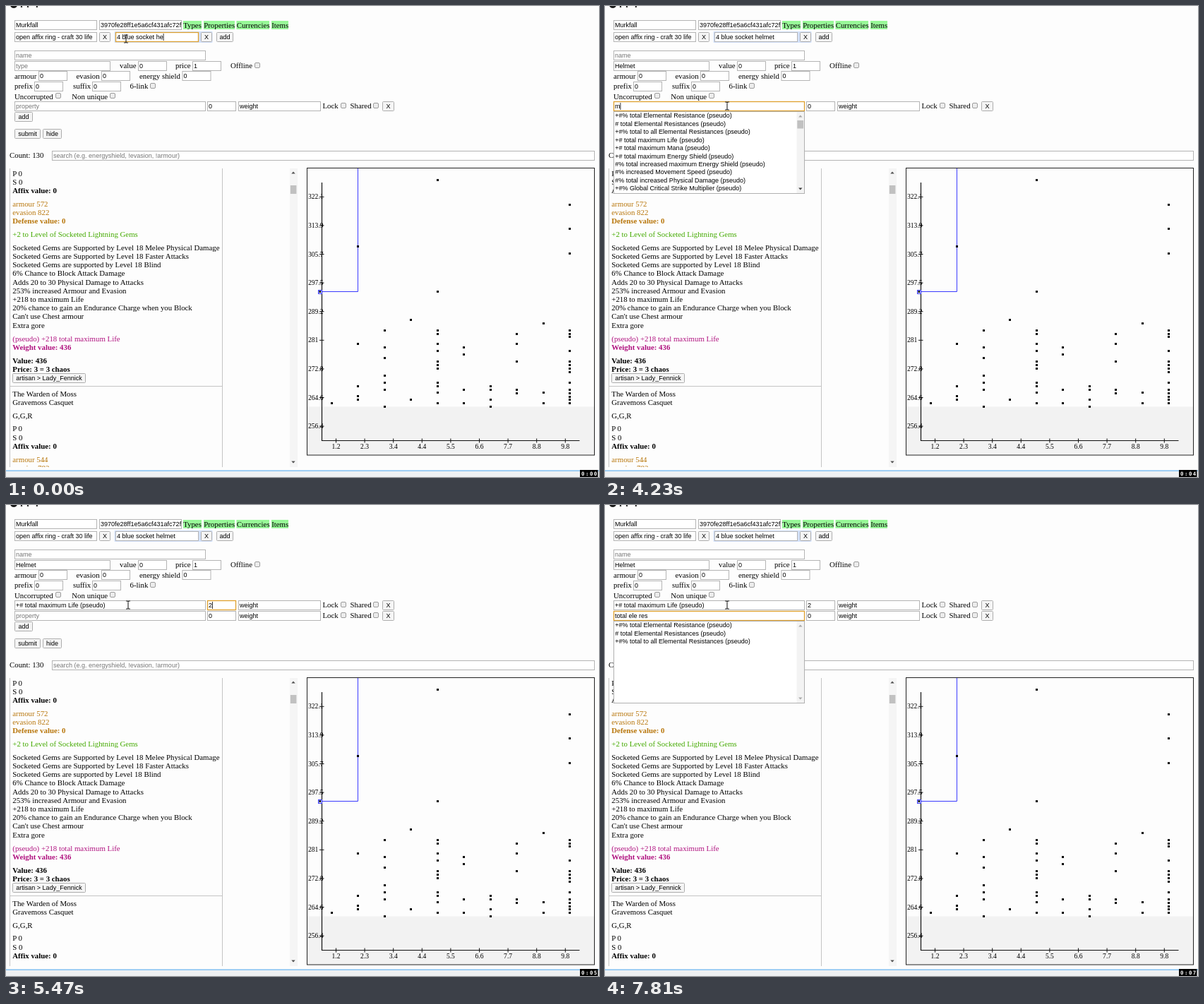
These frames come from a looping animation (840 px wide and 667 px high, 8 s). An HTML page:

```html
<!DOCTYPE html>
<html lang="en">
<head>
<meta charset="utf-8">
<title>Price search</title>
<style>
html, body { margin: 0; width: 100%; height: 100%; overflow: hidden; background: #fdfdfd; }
svg { display: block; }
text { white-space: pre; fill: #000; }
.serif { font: 10.83px "Liberation Serif", serif; }
.tick { font: 9.6px "Liberation Serif", serif; }
.bold { font-weight: bold; }
.sans { font: 9.03px "Liberation Sans", sans-serif; }
.mid { text-anchor: middle; }
.hint { fill: #757575; }
.clock { font: bold 7.4px "DejaVu Sans Mono", monospace; letter-spacing: 1.5px; fill: #fff; }
.orange { fill: #b8760b; }
.green { fill: #4a0; }
.purple { fill: #b0117f; }
</style>
</head>
<body>
<svg id="stage" width="840" height="667" viewBox="0 0 840 667"></svg>
<script>
const NS = 'http://www.w3.org/2000/svg';
const LOOP = 8000;
const stage = document.getElementById('stage');
let layer = stage;

function add(tag, attrs, parent = layer) {
  const node = document.createElementNS(NS, tag);
  for (const key in attrs) node.setAttribute(key, attrs[key]);
  return parent.appendChild(node);
}
function group(attrs, draw, parent = stage) {
  const before = layer, node = add('g', attrs, parent);
  layer = node;
  draw();
  layer = before;
  return node;
}
const box = (x, y, w, h, fill, stroke = 'none', rx = 0) =>
  add('rect', { x, y, width: w, height: h, fill, stroke, rx });
const line = (d, stroke, w = 1) => add('path', { d, stroke, fill: 'none', 'stroke-width': w });
const show = (node, on) => node.style.display = on ? '' : 'none';

function label(x, y, str, cls = 'serif') {
  const node = add('text', { x, y, class: cls });
  node.textContent = str;
  return node;
}
function button(x, y, w, str) {
  box(x + .5, y + .5, w - 1, 13, '#f5f5f5', '#adadad', 1);
  label(x + w / 2, y + 10.1, str, 'sans mid');
}
const check = (x, y) => box(x + .5, y + .5, 7, 7, '#ececec', '#9c9c9c', 1.5);
const arrow = (x, y, dir) =>
  add('path', { d: `M${x - 2.7} ${y + 1.4 * dir}h5.4l-2.7 ${-3 * dir}z`, fill: '#505050' });

function field(x, y, w, value, hint = '') {
  const frame = box(x + .5, y + .5, w - 1, 13, '#fff', '#b4b4b4');
  const mark = box(x + 1.7, y + 2, 5.2, 10, '#3297fd');
  const text = label(x + 2, y + 10.1, '', 'sans');
  const caret = box(0, y + 2, .8, 10, '#000');
  return {
    set(value, focus = false, blink = false, marked = false) {
      const empty = value === '';
      text.textContent = empty ? hint : value;
      text.setAttribute('class', empty ? 'sans hint' : 'sans');
      text.style.fill = marked ? '#fff' : '';
      frame.setAttribute('stroke', focus ? '#dfa12e' : '#b4b4b4');
      frame.setAttribute('stroke-width', focus ? 1.3 : 1);
      show(mark, marked);
      show(caret, focus && blink);
      if (focus && blink)
        caret.setAttribute('x', x + 2 + (empty ? 0 : text.getComputedTextLength()));
    },
    init() { this.set(value); return this; }
  }.init();
}
function propertyRow(y) {
  const prop = field(12, y, 271, '', 'property');
  const amount = field(285, y, 41, '0', 'weight');
  field(329, y, 117, 'weight');
  label(448.5, y + 10.4, 'Lock');
  check(474, y + 2);
  label(487.5, y + 10.4, 'Shared');
  check(520, y + 2);
  button(533, y, 17, 'X');
  return { prop, amount };
}

// Result list: [y, text, style]
const RESULTS = [
  [237, 'P 0'], [249, 'S 0'], [261.3, 'Affix value: 0', 'bold'],
  [280.2, 'armour 572', 'orange'], [292.4, 'evasion 822', 'orange'],
  [304.6, 'Defense value: 0', 'orange bold'],
  [323.5, '+2 to Level of Socketed Lightning Gems', 'green'],
  ...['Socketed Gems are Supported by Level 18 Melee Physical Damage',
    'Socketed Gems are Supported by Level 18 Faster Attacks',
    'Socketed Gems are supported by Level 18 Blind',
    '6% Chance to Block Attack Damage',
    'Adds 20 to 30 Physical Damage to Attacks',
    '253% increased Armour and Evasion',
    '+218 to maximum Life',
    '20% chance to gain an Endurance Charge when you Block',
    "Can't use Chest armour",
    'Extra gore'].map((str, i) => [342.4 + 12.18 * i, str]),
  [471, '(pseudo) +218 total maximum Life', 'purple'],
  [483.2, 'Weight value: 436', 'purple bold'],
  [502, 'Value: 436', 'bold'], [514.2, 'Price: 3 = 3 chaos', 'bold'],
  [549, 'The Warden of Moss'], [561.2, 'Gravemoss Casquet'],
  [580, 'G,G,R'], [598.8, 'P 0'], [611, 'S 0'], [623.2, 'Affix value: 0', 'bold'],
  [642, 'armour 544', 'orange'], [654.2, 'evasion 782', 'orange']
];

// Chart dots: one list of heights per price 1..10
const DOTS = [
  [562],
  [340, 478, 538, 552, 557],
  [459, 483, 498, 523, 533, 543, 567],
  [444, 557],
  [246, 404, 459, 464, 478, 488, 503, 508, 513, 533, 538, 547, 562],
  [483, 493, 543, 562],
  [538, 543, 557, 567],
  [464, 478, 503, 543, 548],
  [449, 547, 562],
  [281, 315, 350, 459, 464, 468, 488, 503, 508, 513, 518, 533, 543, 548, 553, 557, 562]
];

function drawChart() {
  box(427, 230, 407, 406, '#fdfdfd');
  box(427, 567.5, 407, 68.5, '#f2f2f2');
  box(426.5, 229.5, 407, 406.5, 'none', '#222');
  line('M447.5 250V616M447 615.5H812.5', '#111', 1.2);
  for (let i = 0; i < 9; i++) {
    const y = 270.3 + 40.6 * i, x = 467.5 + 40.6 * i;
    line(`M444 ${y}h6.5M${x} 612.5v6`, '#111');
    label(428, y + 3.1, +(322.1 - 8.215 * i).toFixed(1), 'tick');
    label(x, 627.1, (1.2 + 1.08 * i).toFixed(1), 'tick mid');
  }
  line('M498.5 230V404.5H445', '#3a3aff');
  box(442.5, 402.5, 5, 5, '#dfe3ff', '#3a3aff');
  box(443.5, 403.3, 2.6, 2.6, '#000');
  DOTS.forEach((ys, i) => ys.forEach(y => box(Math.round(459.5 + 37.55 * i), y - 1, 3, 3, '#000')));
}

// Page below the property rows
add('rect', { x: 0, y: 0, width: 840, height: 653 }, add('clipPath', { id: 'view' }));
const clipped = add('g', { 'clip-path': 'url(#view)' });
const track = box(402, 230, 11, 423, '#f5f5f5');
const lower = group({}, () => {
  button(12, 150, 26, 'add');
  button(12, 174, 37, 'submit');
  button(52, 174, 27, 'hide');
  label(5, 215, 'Count: 130');
  field(65, 205, 769, '', 'search (e.g. energyshield, !evasion, !armour)');
  drawChart();
  box(402.8, 254, 8.6, 12, '#c1c1c1');
  arrow(407, 236, 1);
});
arrow(407, 646, -1);
const list = group({}, () => {
  line('M5.5 230V660M306.5 230V660M5 538.5H306', '#c4c4c4');
  for (const [y, str, cls = ''] of RESULTS) label(9.3, y + 3.5, str, 'serif ' + cls);
  button(9, 520, 104, 'artisan > Lady_Fennick');
}, clipped);

// Header and form
add('circle', { cx: 11, cy: -2.2, r: 5.2, fill: '#1b1b1b' });
label(20.5, .2, 'pip-quote', 'serif bold');
field(12, 20, 117, 'Murkfall');
field(132, 20, 117, '3970fe28ff1e5a6cf431afc72f');
[['Types', 251, 26], ['Properties', 280, 44], ['Currencies', 326.5, 46.5], ['Items', 376, 24]]
  .forEach(([str, x, w]) => {
    box(x, 21, w, 12, '#98f898');
    label(x + .2, 30.6, str);
  });
field(12, 37, 117, 'open affix ring - craft 30 life');
button(132, 37, 16, 'X');
box(153.5, 36, 139, 16, '#d3e1fb', 'none', 1);
const tab = field(155, 37, 118, '');
button(276, 37, 16, 'X');
button(298, 37, 24, 'add');
field(12, 63, 271, '', 'name');
const type = field(12, 78, 136, '', 'type');
[[161, 88, 'value', 187, '0'], [240, 88, 'price', 264, '1'],
 [12, 102.6, 'armour', 46, '0'], [99.5, 102.6, 'evasion', 135, '0'],
 [189, 102.6, 'energy shield', 249.5, '0'],
 [12, 117.2, 'prefix', 40, '0'], [95, 117.2, 'suffix', 122, '0']
].forEach(([x, y, str, fx, value]) => {
  label(x, y, str);
  field(fx, Math.round(y - 10.3), 41, value);
});
[[318, 88, 'Offline', 352], [175.5, 117.2, '6-link', 204],
 [12, 131.8, 'Uncorrupted', 70], [93.3, 131.8, 'Non unique', 147]
].forEach(([x, y, str, cx]) => {
  label(x, y, str);
  check(cx, Math.round(y - 8.4));
});
const row1 = propertyRow(135);
let row2;
const second = group({}, () => { row2 = propertyRow(150); });

// Suggestion menu
const menu = add('svg', { height: 117 });
layer = menu;
const menuBack = box(.5, .5, 0, 116, '#fff', '#b0b0b0');
const items = Array.from({ length: 10 }, (_, i) => label(2.2, 9.2 + 11.47 * i, '', 'sans'));
const bar = group({}, () => {
  box(0, 1, 10.5, 115, '#f3f3f3');
  box(.8, 13, 8.8, 11.5, '#c1c1c1');
  arrow(5.3, 7, 1);
  arrow(5.3, 110, -1);
}, menu);
layer = stage;
const [, thumb, upArrow, downArrow] = bar.children;
upArrow.setAttribute('fill', '#a8a8a8');

function setMenu(where, lines) {
  show(menu, where);
  if (!where) return;
  const [x, y, w] = where;
  menu.setAttribute('x', x);
  menu.setAttribute('y', y);
  menu.setAttribute('width', w);
  menuBack.setAttribute('width', w - 1);
  bar.setAttribute('transform', `translate(${w - 11.5} 0)`);
  items.forEach((node, i) => node.textContent = lines[i] || '');
  const long = lines.length > 9;
  show(thumb, long);
  downArrow.setAttribute('fill', long ? '#404040' : '#a8a8a8');
}

// Window edge, clock, pointer
box(0, 657.3, 840, 1.7, '#8fc6f3');
box(0, 659, 840, 8, '#eff1f3');
box(813, 657, 25.5, 10, '#000');
const clock = label(815, 664.6, '', 'clock');
const pointer = line('M-3-5.5h2.2l.8.8.8-.8h2.2M0-4.7v9.4M-3 5.5h2.2l.8-.8.8.8h2.2', '#222', 1.1);

// Suggestions
const pseudo = strs => strs.map(str => str + ' (pseudo)');
const ELEMENTAL = pseudo(['+#% total Elemental Resistance', '# total Elemental Resistances',
  '+#% total to all Elemental Resistances']);
const MAXIMUM = pseudo(['+# total maximum Life', '+# total maximum Mana',
  '+# total maximum Energy Shield', '#% total increased maximum Energy Shield']);
const DAMAGE = pseudo(['#% total increased Physical Damage']);
const ALL = [
  ...pseudo(['+#% total to Cold Resistance', '+#% total to Fire Resistance',
    '+#% total to Lightning Resistance']),
  ELEMENTAL[0],
  ...pseudo(['+#% total to Chaos Resistance', '+#% total Resistance', '# total Resistances']),
  ELEMENTAL[1], ELEMENTAL[2], '+# total to Strength (pseudo)'
];
const WITH_M = [...ELEMENTAL, ...MAXIMUM, '#% increased Movement Speed (pseudo)', ...DAMAGE,
  '+#% Global Critical Strike Multiplier (pseudo)'];
const LIFE = [MAXIMUM[0],
  ...['# to maximum Life', '#% increased maximum Life', 'Minions have #% increased maximum Life',
    'Enemies you Kill have a #% chance to Explode, dealing a quarter of their maximum Life',
    'You take #% of your maximum Life as Chaos Damage on use',
    '#% of Maximum Life taken as Chaos Damage per second',
    '#% increased maximum Life, Mana and Global Energy Shield',
    'Raised Zombies have # to maximum Life', '# to Spectre maximum Life'
  ].map(str => str + ' (explicit)')];
const WITH_MAX = [...MAXIMUM, ...LIFE.slice(1, 7)];
const WITH_MA = [...MAXIMUM, ...DAMAGE, ...LIFE.slice(1, 6)];

// Timeline: [ms, value]
const FOCUS = [[0, 'tab'], [1420, 'type'], [3480, 'prop1'], [4900, 'amount'], [5810, 'prop2']];
const CARET = [[0, 1], [830, 0], [1420, 1], [1960, 0], [2280, 1], [2810, 0], [3410, 1],
  [4020, 0], [4230, 1], [4900, 0], [5390, 1], [7810, 0]];
const TAB = [[0, '4 blue socket he'], [100, '4 blue socket hel'], [220, '4 blue socket helm'],
  [330, '4 blue socket helmet']];
const TYPE = [[0, ''], [2280, 'Helmet']];
const PROP1 = [[0, ''], [4230, 'm'], [4360, 'ma'], [4430, 'max'], [4510, 'max '],
  [4580, 'max l'], [4660, 'max li'], [4870, MAXIMUM[0]]];
const AMOUNT = [[0, '0'], [5390, ''], [5470, '2']];
const PROP2 = [[0, ''], [6250, 't'], [6330, 'to'], [6470, 'tot'], [6540, 'tota'], [6600, 'total'],
  [6670, 'total '], [6760, 'total e'], [6840, 'total el'], [6920, 'total ele'],
  [7000, 'total ele '], [7100, 'total ele r'], [7190, 'total ele re'], [7280, 'total ele res']];
const LINES = [[0, []], [1420, ['Helmet']], [3480, ALL], [4230, WITH_M], [4360, WITH_MA],
  [4430, WITH_MAX], [4580, LIFE], [5810, ALL], [6840, ELEMENTAL]];
const CLOCK = [[0, 0], [1040, 1], [2070, 2], [3090, 3], [4110, 4], [5160, 5], [6180, 6], [7190, 7]];
const POINTER = [[0, [170, 46.5]], [900, [160, 51]], [970, [141, 62]], [1040, [122, 72]],
  [1110, [108, 78]], [1170, [103, 79.5]], [3030, [112, 88]], [3090, [131, 103]],
  [3150, [152, 123]], [3210, [167, 137]], [3270, [173, 141.5]]];
const MENU_AT = { type: [12, 91, 136], prop1: [12, 149, 271], prop2: [12, 164, 271] };

const at = (steps, t) => steps.findLast(([ms]) => ms <= t)[1];

function render(t) {
  const focus = at(FOCUS, t), blink = !!at(CARET, t);
  const put = (input, name, steps) => input.set(at(steps, t), focus === name, blink);
  put(tab, 'tab', TAB);
  put(type, 'type', TYPE);
  put(row1.prop, 'prop1', PROP1);
  put(row2.prop, 'prop2', PROP2);
  row1.amount.set(at(AMOUNT, t), focus === 'amount', blink, t >= 4900 && t < 5390);
  setMenu(MENU_AT[focus], at(LINES, t));

  const grown = t >= 4870, shift = `translate(0 ${grown ? 15 : 0})`;
  show(second, grown);
  lower.setAttribute('transform', shift);
  list.setAttribute('transform', shift);
  track.setAttribute('y', grown ? 245 : 230);
  track.setAttribute('height', grown ? 408 : 423);

  clock.textContent = '0:0' + at(CLOCK, t);
  pointer.setAttribute('transform', `translate(${at(POINTER, t)})`);
}

const start = performance.now();
function tick() {
  render((performance.now() - start) % LOOP);
  requestAnimationFrame(tick);
}
tick();
</script>
</body>
</html>
```
